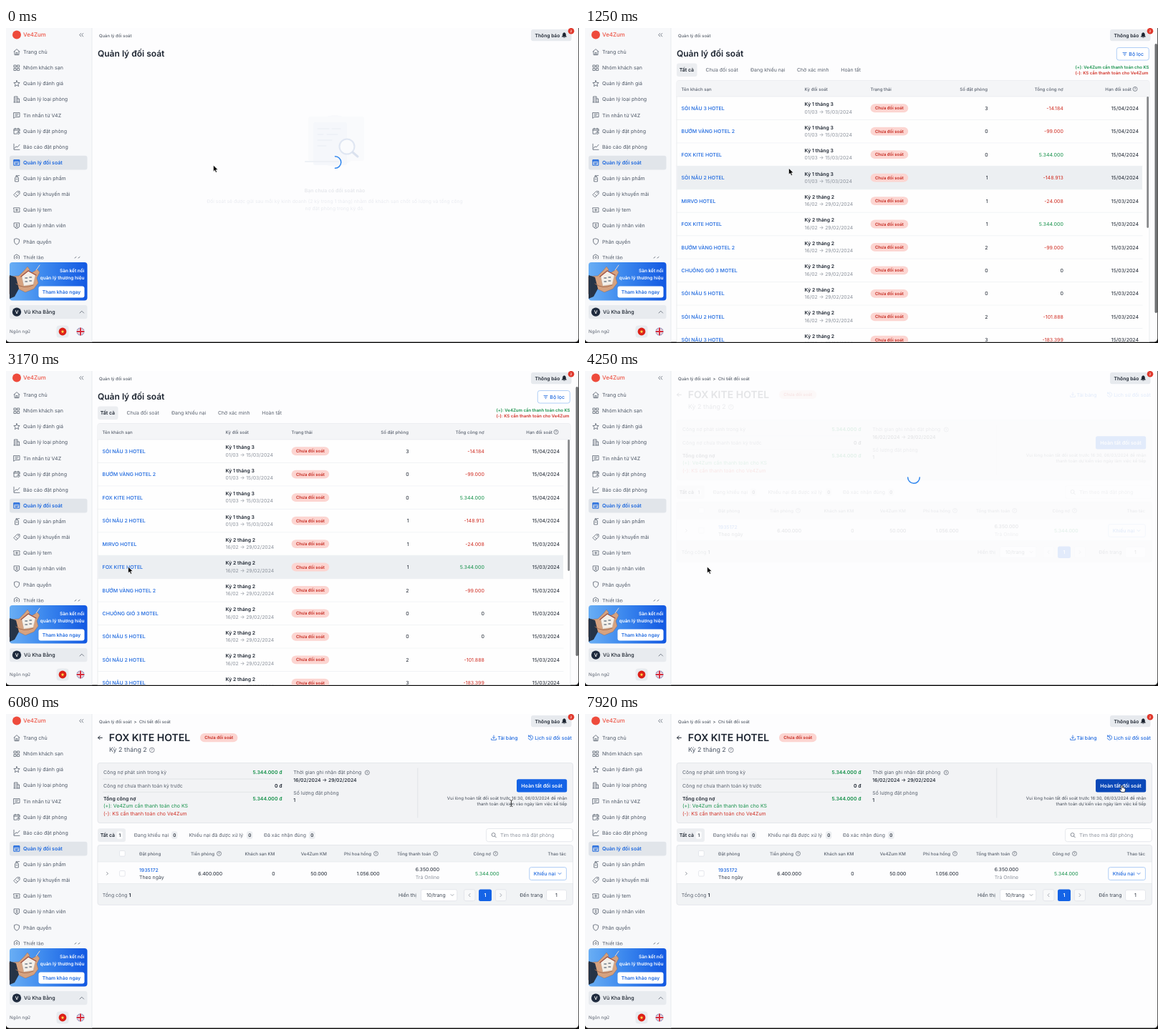
An HTML page that plays this animation: 800x441 px, repeating every 8 s.

```html
<!DOCTYPE html>
<html lang="vi">
<head>
<meta charset="utf-8">
<title>Quản lý đối soát</title>
<style>
html,body{margin:0;width:100%;height:100%;overflow:hidden;background:#111}
svg{display:block;width:100vw;height:100vh}
text{font-family:Inter,Roboto,sans-serif;text-rendering:geometricPrecision;white-space:pre}
</style>
</head>
<body>
<svg id="stage" viewBox="0 0 800 441" preserveAspectRatio="none"></svg>
<script>
const BLUE = '#1a66de', GREEN = '#15914a', RED = '#d02f25', INK = '#1c2430', GRAY = '#59616e', PALE = '#8d939d', LINE = '#e1e4e9';
const BRAND = 'Ve4Zum', HOTEL = 'FOX KITE HOTEL', LOOP = 8000;

const text = (x, y, s, size = 7, fill = GRAY, weight = 400, anchor = 'start') =>
  `<text x="${x}" y="${y}" font-size="${size}" fill="${fill}" font-weight="${weight}" text-anchor="${anchor}">${s}</text>`;
const right = (x, y, s, size, fill, weight) => text(x, y, s, size, fill, weight, 'end');
const mid = (x, y, s, size, fill, weight) => text(x, y, s, size, fill, weight, 'middle');
const box = (x, y, x2, y2, fill, r = 0, stroke = 'none') =>
  `<rect x="${x}" y="${y}" width="${x2 - x}" height="${y2 - y}" rx="${r}" fill="${fill}" stroke="${stroke}" stroke-width=".7"/>`;
const path = (d, stroke, w = .8, fill = 'none') =>
  `<path d="${d}" fill="${fill}" stroke="${stroke}" stroke-width="${w}" stroke-linecap="round" stroke-linejoin="round"/>`;
const dot = (x, y, r, fill, stroke = 'none') =>
  `<circle cx="${x}" cy="${y}" r="${r}" fill="${fill}" stroke="${stroke}" stroke-width=".7"/>`;
const at = (x, y, s) => `<g transform="translate(${x} ${y})">${s}</g>`;
const group = (id, s) => `<g id="${id}">${s}</g>`;
const help = (x, y, r = 3) => dot(x, y, r, 'none', GRAY) + mid(x, y + 1.6, '?', 4.6, GRAY, 500);
const down = (x, y, c = GRAY) => path(`M${x - 2} ${y - 1}l2 2 2-2`, c);
const badge = (x, y, x2, y2) => box(x, y, x2, y2, '#fcd5d1', 6) + mid((x + x2) / 2, (y + y2) / 2 + 2.1, 'Chưa đối soát', 6, '#c5291f', 600);

const MENU = [
  ['Trang chủ', 'M-4-.5L0-4 4-.5M-3-1V4H3V-1M-1 4V1H1V4'],
  ['Nhóm khách sạn', 'M-3.7-3.7h2.8v2.8h-2.8zM.9-3.7h2.8v2.8H.9zM-3.7.9h2.8v2.8h-2.8zM.9.9h2.8v2.8H.9z'],
  ['Quản lý đánh giá', 'M0-4.2L1.2-1.4 4.2-1.2 1.9.8 2.6 3.8 0 2.2-2.6 3.8-1.9.8-4.2-1.2-1.2-1.4z'],
  ['Quản lý loại phòng', 'M-3.5 4V-4H1V4M1-1H3.5V4M-4 4H4M-2-2h1.4M-2 0h1.4M-2 2h1.4'],
  ['Tin nhắn từ V4Z', 'M-4-3.5H4V2.5H-2L-4 4zM-2-1.5H2M-2 .5H1'],
  ['Quản lý đặt phòng', 'M4 0V-3H-4V4H0M-4-1H4M-2-4v1.5M2-4v1.5M2.3.7a1.8 1.8 0 1 0 .1 0M2.3 1.6v1h.8'],
  ['Báo cáo đặt phòng', 'M-4-4V4H4M-3 2L-1-.5 1 .5 4-3'],
  ['Quản lý đối soát', 'M-3.8-3.8H3.8V3.8H-3.8zM-3.8-2.8H3.8M-3.8-1.5H3.8M-2 .5H2M-2 2H1'],
  ['Quản lý sản phẩm', 'M-2.4 4V-1L-1-2H1L2.4-1V4zM-1-2V-4H1V-2M2-4h1.5M-1 1H1'],
  ['Quản lý khuyến mãi', 'M-4 .5L.5-4H4V-.5L-.5 4zM1.5-2h1M-1 0L1 2'],
  ['Quản lý tem', 'M-4-3H4V-1Q3 0 4 1V3H-4V1Q-3 0-4-1zM0-1.6V1.6M-1.6 0H1.6'],
  ['Quản lý nhân viên', 'M-3.5-4H3.5V1.5L0 4-3.5 1.5zM0-2.2a1.1 1.1 0 1 0 .1 0M-1.8 2Q0-.2 1.8 2'],
  ['Phân quyền', 'M0-4.2L3.5-3V0Q3.3 2.8 0 4.2-3.3 2.8-3.5 0V-3z'],
  ['Thiết lập', 'M0-4L3.5-2V2L0 4-3.5 2V-2zM0-1.3a1.3 1.3 0 1 0 .1 0']
];

function sidebar() {
  let s = box(0, -5, 120, 440, '#f7f8fa') + path('M120 0V440', LINE, .7);
  s += dot(15, 9.5, 6, '#ee4b3c') + text(24, 12.4, BRAND, 7.9, '#ee5546', 500);
  s += path('M104.7 7.5l-2 2.2 2 2.2M107.7 7.5l-2 2.2 2 2.2', GRAY);
  s += box(5, 178.7, 113.5, 198.5, '#e1e5ea', 3);
  s += '<g clip-path="url(#menuClip)">' + MENU.map(([label, icon], i) => {
    const y = 33.6 + i * 22.12, on = i === 7;
    return at(15, y, path(icon, on ? BLUE : '#4c5665', on ? 1 : .75)) + text(24, y + 2.5, label, 7.05, on ? BLUE : '#4c5665', on ? 600 : 400);
  }).join('') + path('M96 322l2-1.5M101 322l2-1.5', GRAY) + '</g>';
  return s + banner() + account();
}

function banner() {
  const hand = path('M5 348L18 347 26 339 30 334 33 338 29 347 37 342 44 338 47 342 43 350 45 357 39 365 27 370 15 364 5 372z', '#8e5b42', .4, '#d6a27f')
    + path('M5 346L14 349 18 365 12 376 5 379z', 'none', 0, '#263447')
    + path('M14 358Q24 366 38 360', '#a66d50', 1)
    + path('M22 347L31 340 41 346 38 359 25 361z', '#bdb6ae', .4, '#f3efe9')
    + path('M21 348L31 340 42 346', '#a2503f', 1.3)
    + path('M27 350h2.5M33 349h2.5M27 355h2.5M33 354h2.5', '#727c88', 1.6)
    + path('M42 339L47 332', '#f0dac9', 1);
  return box(5, 328, 113.5, 381.5, 'url(#sky)', 4) + hand
    + right(109.5, 342.2, 'Sàn kết nối', 6.5, '#fff', 600) + right(109.5, 352.2, 'quản lý thương hiệu', 6.5, '#fff', 600)
    + box(45.5, 361.5, 109.5, 377.5, '#fff', 3) + mid(77.5, 372, 'Tham khảo ngay', 6.7, BLUE, 600);
}

function account() {
  let s = box(5, 388, 113.5, 407.3, '#e8ebef', 3) + dot(15, 397.6, 6.2, '#1f2b3e') + mid(15, 400, 'V', 6.5, '#fff', 600);
  s += text(25, 400.2, 'Vũ Kha Bằng', 7.1, INK, 500) + path('M103 399l2.8-2.8 2.8 2.8', GRAY);
  s += text(5, 427, 'Ngôn ngữ', 6.2, GRAY) + box(70.5, 416.5, 87.5, 433.5, '#e8ebef', 4) + dot(79, 425, 5.4, '#dc2018');
  s += path('M79 422.6l.6 1.7h1.8l-1.4 1.1.5 1.8-1.5-1-1.5 1 .5-1.8-1.4-1.1h1.8z', 'none', 0, '#ffe14d');
  s += dot(104, 425, 5.4, '#294a9c') + '<g clip-path="url(#flagClip)">'
    + path('M99 420l10 10M109 420l-10 10', '#fff', 1.8) + path('M99 420l10 10M109 420l-10 10', '#d62b3b', .6)
    + path('M98 425h12M104 419v12', '#fff', 3.4) + path('M98 425h12M104 419v12', '#d62b3b', 1.9) + '</g>';
  return s;
}

function header() {
  return text(130, 13, 'Quản lý đối soát', 5.95, '#3d4653')
    + group('crumb', text(178.5, 13, '&gt;', 5.95, INK) + text(186, 13, 'Chi tiết đối soát', 5.95, '#3d4653'))
    + box(733, 2, 789.5, 18.3, '#e7eaee', 3) + text(738.6, 12.8, 'Thông báo', 6.7, INK, 600)
    + path('M776.3 12.2h6.2l-1-1.4v-2q-.2-2-2.1-2.2-1.9.2-2.1 2.2v2zM778.6 13.4h1.6', INK, .5, INK)
    + dot(789, 4.3, 4.3, '#e0382c') + mid(789, 6, '2', 4.6, '#fff', 500);
}

function emptyState() {
  const d = '#eef1f6';
  return text(128, 39.8, 'Quản lý đối soát', 12, INK, 600)
    + dot(459, 158, 36, '#f8f9fc') + box(422, 124, 500, 186, '#f9fafc', 3) + box(429, 132, 476, 192, '#f5f7fb', 3)
    + path('M435 141h16M455 141h12M435 149h8M448 149h15M435 157h20M435 165h12', d, 1.4) + path('M418 187h46', d, 2)
    + dot(476, 166, 10, '#fafbfd') + `<circle cx="476" cy="166" r="10.5" fill="none" stroke="#dfe6f2" stroke-width="2"/>`
    + path('M484 174l7 6', '#dbe2ee', 3)
    + mid(459, 229.6, 'Bạn chưa có đối soát nào', 7, '#e5e7eb', 600)
    + mid(459, 245.4, 'Đối soát sẽ được gửi sau mỗi kỳ kinh doanh (2 kỳ trong 1 tháng) nhằm để khách sạn chốt số lượng và tổng công', 6.8, '#e9ebf0')
    + mid(459, 255.4, 'nợ đặt phòng trong kỳ đó.', 6.8, '#e9ebf0');
}

const ROWS = [
  ['SỎI NÂU 3 HOTEL', 3, '-14.184'], ['BƯỚM VÀNG HOTEL 2', 0, '-99.000'], [HOTEL, 0, '5.344.000'], ['SỎI NÂU 2 HOTEL', 1, '-148.913'],
  ['MIRVO HOTEL', 1, '-24.008'], [HOTEL, 1, '5.344.000'], ['BƯỚM VÀNG HOTEL 2', 2, '-99.000'], ['CHUÔNG GIÓ 3 MOTEL', 0, '0'],
  ['SỎI NÂU 5 HOTEL', 0, '0'], ['SỎI NÂU 2 HOTEL', 2, '-101.888'], ['SỎI NÂU 3 HOTEL', 3, '-183.399']
];
const ROW_TOP = 96, ROW_H = 32.45;

function row([name, count, debt], i) {
  const c = ROW_TOP + (i + .5) * ROW_H, late = i > 3;
  const tone = debt[0] === '-' ? RED : debt === '0' ? INK : GREEN;
  return text(134.6, c + 2.6, name, 7, BLUE, 500)
    + text(306.6, c - 3, late ? 'Kỳ 2 tháng 2' : 'Kỳ 1 tháng 3', 6.9, INK, 600)
    + text(306.6, c + 7.3, late ? '16/02 → 29/02/2024' : '01/03 → 15/03/2024', 6.9, PALE)
    + badge(398.6, c - 5.9, 451.2, c + 5.9)
    + right(562.6, c + 2.6, count, 7, INK) + right(667.8, c + 2.6, debt, 7, tone)
    + right(773, c + 2.6, late ? '15/03/2024' : '15/04/2024', 7, INK)
    + path(`M128 ${c + ROW_H / 2}H778`, '#eaecf0', .6);
}

function listPage() {
  let s = text(128, 39.8, 'Quản lý đối soát', 12, INK, 600);
  s += box(742.3, 27.5, 787.3, 45, '#fff', 3, '#8fb9f3') + path('M751 34.5h5M752 36.5h3M753 38.5h1', BLUE) + text(759.3, 38.8, 'Bộ lọc', 7, BLUE, 500);
  s += box(128, 49.5, 156.5, 68, '#eceef1', 3);
  s += [[131.8, 'Tất cả'], [168.6, 'Chưa đối soát'], [231, 'Đang khiếu nại'], [296, 'Chờ xác minh'], [357.3, 'Hoàn tất']]
    .map(([x, t], i) => text(x, 61.3, t, 6.9, i ? GRAY : INK, i ? 400 : 600)).join('');
  s += right(787.5, 56.7, `(+): ${BRAND} cần thanh toán cho KS`, 6, GREEN, 600) + right(786.3, 64.7, `(-): KS cần thanh toán cho ${BRAND}`, 6, RED, 600);
  s += box(128, 73.5, 788, 450, '#fefefe', 3, LINE) + box(128.3, 73.8, 787.6, 96, '#f4f5f7', 3) + path('M128 96H788', LINE, .6);
  s += [[134.6, 'Tên khách sạn'], [306.6, 'Kỳ đối soát'], [398.6, 'Trạng thái']].map(([x, t]) => text(x, 87.6, t, 6.1, GRAY, 500)).join('');
  s += [[562, 'Số đặt phòng'], [667.6, 'Tổng công nợ'], [762.8, 'Hạn đối soát']].map(([x, t]) => right(x, 87.6, t, 6.1, GRAY, 500)).join('');
  s += help(768, 85.4) + `<rect id="hover" x="128.4" width="649.6" height="${ROW_H}" fill="#eceff2"/>` + ROWS.map(row).join('');
  return s + box(784.3, 96, 787, 280, '#858789', 1.4) + box(795.5, 22, 799, 399, '#707274', 1.7);
}

function summary() {
  let s = box(128, 68.5, 791.5, 152.5, '#f2f3f5', 3, '#dde0e5') + path('M135.5 91H386M135.5 109.3H386M574.8 76V145', '#d5d8de', .6);
  s += text(136, 84.3, 'Công nợ phát sinh trong kỳ', 6.9) + right(385.5, 84.3, '5.344.000 đ', 6.9, GREEN, 600);
  s += text(136, 102.8, 'Công nợ chưa thanh toán kỳ trước', 6.9) + right(385.5, 102.8, '0 đ', 6.9, INK, 600);
  s += text(136, 121.3, 'Tổng công nợ', 6.9, INK, 600) + right(385.5, 121.3, '5.344.000 đ', 6.9, GREEN, 600);
  s += text(136, 131.4, `(+): ${BRAND} cần thanh toán cho KS`, 7, GREEN) + text(136, 141.6, `(-): KS cần thanh toán cho ${BRAND}`, 7, RED);
  s += text(401.3, 84.3, 'Thời gian ghi nhận đặt phòng', 6.9) + help(504.3, 82) + text(401.3, 94.6, '16/02/2024 → 29/02/2024', 6.9, INK, 500);
  s += text(401.3, 113, 'Số lượng đặt phòng', 6.9) + text(401.3, 123.3, '1', 6.9, INK, 500);
  s += '<rect id="done" x="713" y="91.2" width="70.2" height="18.2" rx="2.5"/>' + mid(748, 102.8, 'Hoàn tất đối soát', 7, '#fff', 600);
  s += right(783.5, 119.6, 'Vui lòng hoàn tất đối soát trước 16:30, 06/03/2024 để nhận', 6, '#454d59');
  return s + right(783.5, 127.6, 'thanh toán dự kiến vào ngày làm việc kế tiếp', 6, '#454d59');
}

function booking() {
  const check = y => box(158.6, y - 3.8, 166.2, y + 3.8, '#fff', 1.2, '#dcdfe5');
  let s = box(128, 160.3, 167, 179, '#eceef1', 3);
  s += [[131.8, 'Tất cả', 158.8], [178.8, 'Đang khiếu nại', 235.2], [255.4, 'Khiếu nại đã được xử lý', 340.2], [360, 'Đã xác nhận đúng', 427.4]]
    .map(([x, t, p], i) => text(x, 172, t, 6.9, i ? GRAY : INK, i ? 400 : 600)
      + box(p - 4.2, 164.3, p + 4.2, 175, i ? '#eceef1' : '#fafbfc', 3) + mid(p, 171.9, i ? 0 : 1, 6.4, INK, 500)).join('');
  s += box(670.5, 160.5, 791.3, 178.7, '#fff', 3, '#dde0e5') + dot(680.6, 169, 2.5, 'none', GRAY) + path('M682.5 171l1.8 1.8', GRAY) + text(690, 172, 'Tìm theo mã đặt phòng', 6.9, PALE);
  s += box(128, 183.5, 791.5, 267.3, '#f1f3f5', 3, '#dde0e5') + box(128.3, 207, 791.2, 237.5, '#fdfdfe') + path('M128 207H791.5M128 237.5H791.5', LINE, .6);
  s += check(195.3) + check(223.3) + path('M140.6 221.6l1.8 1.8-1.8 1.8', GRAY, .7);
  s += text(186, 197.6, 'Đặt phòng', 6.1, GRAY, 500);
  s += [[291, 'Tiền phòng', 1], [375.3, 'Khách sạn KM'], [447.8, BRAND + ' KM'], [510, 'Phí hoa hồng', 1], [593.3, 'Tổng thanh toán', 1], [677, 'Công nợ', 1], [782, 'Thao tác']]
    .map(([x, t, q]) => right(x, 197.6, t, 6.1, GRAY, 500) + (q ? help(x + 6.5, 195.4) : '')).join('');
  s += text(186, 220.5, '1935172', 6.9, BLUE, 500) + text(186, 231.2, 'Theo ngày', 6.9, '#3d4653');
  s += [[302, '6.400.000'], [375.6, '0'], [448.4, '50.000'], [521.5, '1.056.000']].map(([x, t]) => right(x, 225.6, t, 6.9, INK)).join('');
  s += right(605, 220.2, '6.350.000', 6.9, INK) + right(605, 230.8, 'Trả Online', 6.9, PALE) + right(688.5, 225.6, '5.344.000', 6.9, GREEN);
  s += box(730.8, 214.6, 782.4, 232.4, '#fff', 2.5, '#8fb9f3') + text(736.7, 226, 'Khiếu nại', 6.9, BLUE, 500) + down(773, 223.5, BLUE);
  s += text(134.8, 256.2, 'Tổng cộng <tspan font-weight="600" fill="#1c2430">1</tspan>', 6.9);
  s += text(548, 256.2, 'Hiển thị', 6.9, '#3d4653') + box(579.5, 245.7, 629.7, 261.7, '#fff', 2.5, '#dde0e5') + text(587, 256.2, '10/trang', 6.9, '#3d4653') + down(623, 253.5, PALE);
  s += box(639.5, 245.7, 655, 261.7, '#f8f9fa', 2.5, '#dde0e5') + path('M648 251.5l-1.9 2.1 1.9 2.1', PALE);
  s += box(660, 245.4, 678, 262, '#1463e6', 2.5) + mid(669, 256.2, '1', 7, '#fff', 600);
  s += box(683.2, 245.7, 698.5, 261.7, '#f8f9fa', 2.5, '#dde0e5') + path('M690 251.5l1.9 2.1-1.9 2.1', PALE);
  return s + text(717.3, 256.2, 'Đến trang', 6.9, '#3d4653') + box(754.5, 246.3, 782.5, 261.3, '#fff', 2.5, '#dde0e5') + mid(768.3, 256.2, '1', 6.9, INK);
}

function detailPage() {
  return path('M134.3 33.2h-5.6M131 30.8l-2.4 2.4 2.4 2.4', INK, 1)
    + text(143.8, 38.2, HOTEL, 14, INK, 600) + badge(271, 27, 323.4, 39.3)
    + text(144, 53.4, 'Kỳ 2 tháng 2', 8.9, '#4c5665') + help(203.8, 50.4, 3.3)
    + path('M681 30v4M679.4 32.6l1.6 1.6 1.6-1.6M677.6 34.5v1.8h6.8v-1.8', BLUE) + text(686.4, 35.8, 'Tải bảng', 6.9, BLUE, 500)
    + path('M729.8 31.2a3.2 3.2 0 1 1-.5 2.6M729.5 29.8v1.8h1.8M732.2 31.4v2l1.4.8', BLUE) + text(738.2, 35.8, 'Lịch sử đối soát', 6.9, BLUE, 500)
    + summary() + booking();
}

const ARROW = path('M0 0V8.6L2 6.8 3.4 10 5 9.3 3.6 6.3H6.3z', '#fff', .6, '#000');
const BEAM = path('M-1.6-4.5Q0-4.5 0-3.5 0-4.5 1.6-4.5M0-3.5V3.5M-1.6 4.5Q0 4.5 0 3.5 0 4.5 1.6 4.5M-.9 1H.9', '#222', .8);
const HAND = path('M-.9 .5Q0-.6.9.5V3.6Q2-.1 2.4 3.9 3.4 3.2 3.7 4.4 4.8 4 4.8 5.4V7Q4.6 8.4 3.8 9.6H-.6Q-1.6 8-3.4 5.8-3-.1-.9 6z'.replace('-3-.1', '-3 4.4'), '#111', .7, '#fff');

const stage = document.getElementById('stage');
stage.innerHTML = `<defs>
  <linearGradient id="sky"><stop stop-color="#69aef4"/><stop offset=".45" stop-color="#3c88ee"/><stop offset="1" stop-color="#1258e2"/></linearGradient>
  <clipPath id="menuClip"><rect y="0" width="120" height="323.5"/></clipPath>
  <clipPath id="flagClip"><circle cx="104" cy="425" r="5.4"/></clipPath>
  <clipPath id="window"><rect x="0" y="-10" width="799.3" height="449.6" rx="5"/></clipPath></defs>
  <rect width="800" height="441" fill="#111"/>
  <g clip-path="url(#window)"><rect width="800" height="441" fill="#fdfdfe"/>`
  + group('empty', emptyState()) + group('list', listPage()) + group('detail', detailPage()) + header() + sidebar()
  + group('spin', path('M0-8.3A8.3 8.3 0 0 1 0 8.3', '#2f86ee', 1.5)) + '</g>'
  + group('arrow', ARROW) + group('beam', BEAM) + group('hand', HAND);

const $ = id => document.getElementById(id);
const show = (id, o) => {
  $(id).setAttribute('opacity', o);
  $(id).setAttribute('display', o > 0 ? 'inline' : 'none');
};
const clamp = v => Math.max(0, Math.min(1, v));
const ease = v => v * v * (3 - 2 * v);

const LIST_AT = 600, OPEN_AT = 3600, READY_AT = 4280;
const TRAIL = [[0, 289.5, 192.3], [600, 289.5, 192.3], [1150, 284.5, 196.5], [1700, 284.5, 196.5], [2750, 170.6, 274.2],
  [4300, 170.6, 274.2], [4900, 195, 269], [5100, 195, 269], [5950, 705.5, 125], [6250, 705.5, 125], [6700, 749.5, 99.8], [LOOP, 749.5, 99.8]];

function pointer(t) {
  const i = TRAIL.findIndex(k => k[0] > t), [t0, x0, y0] = TRAIL[i - 1], [t1, x1, y1] = TRAIL[i];
  const p = ease((t - t0) / (t1 - t0));
  return [x0 + (x1 - x0) * p, y0 + (y1 - y0) * p];
}

function draw(t) {
  const [x, y] = pointer(t), opened = t >= OPEN_AT;
  const loaded = clamp((t - READY_AT) / 280);
  show('empty', t < LIST_AT ? 1 : 0);
  show('list', opened ? 0 : clamp((t - LIST_AT) / 200));
  show('detail', opened ? .11 + .89 * loaded : 0);
  show('crumb', opened ? 1 : 0);
  show('spin', opened ? 1 - loaded : 1 - clamp((t - LIST_AT) / 150));
  $('spin').setAttribute('transform', opened
    ? `translate(459 149) rotate(${90 + (t - 4250) * .36})` : `translate(459.5 188) rotate(${t * .36})`);
  $('hover').setAttribute('y', ROW_TOP + Math.floor((y - ROW_TOP) / ROW_H) * ROW_H);

  const onButton = opened && x > 713 && x < 783 && y > 91 && y < 109.5;
  const onText = opened && x > 614 && y > 113 && y < 129;
  $('done').setAttribute('fill', onButton ? '#0b48b8' : '#1463e6');
  const kind = onButton ? 'hand' : onText ? 'beam' : 'arrow';
  for (const id of ['arrow', 'beam', 'hand']) show(id, id === kind ? 1 : 0);
  $(kind).setAttribute('transform', `translate(${x} ${y})`);
}

function tick() {
  draw(performance.now() % LOOP);
  requestAnimationFrame(tick);
}
tick();
</script>
</body>
</html>
```
